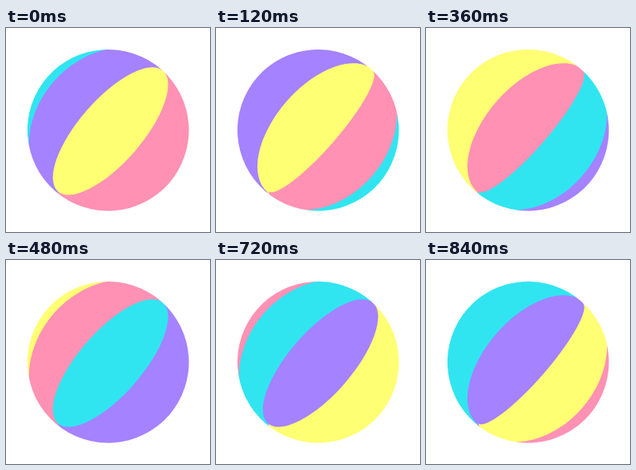
Animation of 256 by 256 pixels, one loop 960 ms. Source, as an HTML page with a canvas:

```html
<!DOCTYPE html>
<html lang="en">
<head>
<meta charset="utf-8">
<title>Rolling ball</title>
<style>
  html, body { margin: 0; width: 100%; height: 100%; overflow: hidden; background: #fff; }
  canvas { display: block; width: 256px; height: 256px; }
</style>
</head>
<body>
<canvas width="256" height="256"></canvas>
<script>
const ctx = document.querySelector('canvas').getContext('2d');
const CENTER = 128.2, RADIUS = 101.3, FAR = 200;
const STEP_MS = 120, STEPS = 8;
const COLORS = ['#30e5f0', '#a582ff', '#ffff73', '#ff91b4'];
const rad = degrees => degrees * Math.PI / 180;

const TILT = rad(-49);
const PANEL = rad(46);                      // longitude covered by one panel
const FIRST_SEAM = [rad(-69), rad(-34)];    // the two alternating poses
const SEAMS = 3;
const AXIS_SHIFT = 3;                       // the axis lies slightly off centre

// Fill everything beyond the seam at this longitude; x runs along the ball's axis.
function fillBeyond(longitude, color) {
  const sin = Math.sin(longitude);
  const reach = 100 * (1 + 0.16 * sin ** 4);  // seams near the rim run past the poles
  ctx.fillStyle = color;
  ctx.beginPath();
  ctx.ellipse(1, AXIS_SHIFT, reach, RADIUS * Math.abs(sin), 0, Math.PI, 0, sin > 0);
  ctx.lineTo(FAR, FAR);
  ctx.lineTo(-FAR, FAR);
  ctx.fill();
}

function draw(time) {
  const step = Math.floor(time / STEP_MS) % STEPS;
  const shift = Math.ceil(step / 2);
  const color = i => COLORS[(i + shift) % COLORS.length];

  ctx.setTransform(1, 0, 0, 1, CENTER, CENTER);
  ctx.rotate(TILT);
  ctx.fillStyle = color(0);
  ctx.fillRect(-FAR, -FAR, 2 * FAR, 2 * FAR);
  for (let i = 0; i < SEAMS; i++) {
    fillBeyond(FIRST_SEAM[step % 2] + i * PANEL, color(i + 1));
  }

  // White surround with a round hole.
  ctx.fillStyle = '#fff';
  ctx.beginPath();
  ctx.rect(-FAR, -FAR, 2 * FAR, 2 * FAR);
  ctx.arc(0, 0, RADIUS, 0, 2 * Math.PI);
  ctx.fill('evenodd');
}

const start = performance.now();
function frame() {
  draw(performance.now() - start);
  requestAnimationFrame(frame);
}
frame();
</script>
</body>
</html>
```
